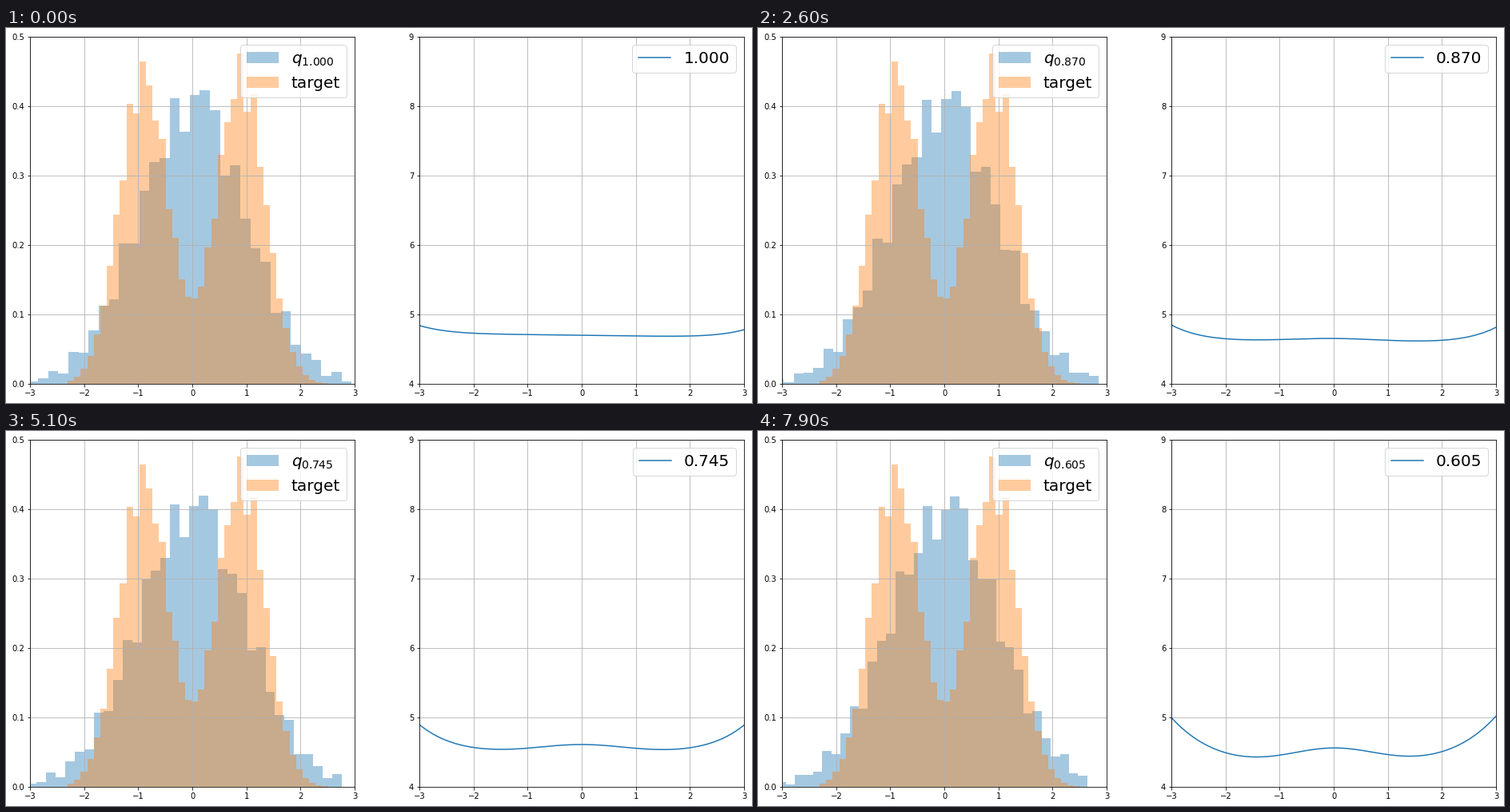
A matplotlib script that plays this animation: 933 by 470 pixels, repeating every 8000 ms.

```python
import numpy as np
import matplotlib.pyplot as plt
from matplotlib.animation import FuncAnimation

W, H, DPI = 933, 470, 72
FRAMES, INTERVAL = 80, 100
LEFT, BOTTOM, AX_W, AX_H = 30.2, 24, 405.82, 434.88

BINS = np.arange(-20, 14)  # counted from the bin just right of the centre
FIXED_START, FIXED_WIDTH, FIXED_BINS = -2.3063, .12063, 40
XS = np.linspace(-3, 3, 200)


def normal(x, mean=0, sd=1):
    return np.exp(-((x - mean) / sd) ** 2 / 2) / (sd * np.sqrt(2 * np.pi))


def ripple(distance, period):
    return np.cos(2 * np.pi * distance / period)


def fixed_heights(x):
    """Two equal bumps, with a ripple as sampling scatter."""
    p = (normal(x, -.9, .45) + normal(x, .9, .45)) / 2
    return p + .04 * ripple(x + .873, .289) * (p / .44) ** 2


def moving_heights(x, u):
    """One bump whose scatter stays put while the bins slide over it."""
    p = normal(x, sd=1 + .02 * u)
    distance = np.maximum(np.abs(x - .25) - .13, 0)
    return p + .035 * ripple(distance, .46) * np.sqrt(p / .4)


def histogram(u):
    width = .187 - .014 * u - .004 * u ** 2
    lefts = .3252 - .0488 * u + BINS * width
    return lefts, moving_heights(lefts + width / 2, u), width


def curve(u):
    """A flat bowl that steepens while a hump grows in its middle."""
    hump = .08 * u + .116 * u ** 2
    base = 4.70 - .139 * u - hump
    rise = 4.81 + .1975 * u ** 2 - base
    power = 6 - 2 * u ** 1.5
    tilt = -.01 + .014 * u
    return (base + rise * np.abs(XS / 3) ** power
            + hump * np.exp(-XS ** 2 / 1.25) + tilt * XS)


def make_axes(left, ylim, yticks):
    ax = fig.add_axes([left / W, BOTTOM / H, AX_W / W, AX_H / H])
    ax.set(xlim=(-3, 3), ylim=ylim, xticks=range(-3, 4), yticks=yticks)
    ax.grid(True)
    ax.set_autoscale_on(False)
    return ax


def draw_bars(lefts, heights, width, color, label):
    return hist_ax.bar(lefts, heights, width, align="edge", color=color,
                       alpha=.4, label=label)


def first_label(ax):
    return ax.legend(loc="upper right", fontsize=20).get_texts()[0]


fig = plt.figure(figsize=(W / DPI, H / DPI), dpi=DPI, facecolor="white")
hist_ax = make_axes(LEFT, (0, .5), np.arange(6) / 10)
line_ax = make_axes(LEFT + 1.2 * AX_W, (4, 9), range(4, 10))

bars = draw_bars(*histogram(0), "C0", "$q_{1.000}$")
fixed = FIXED_START + np.arange(FIXED_BINS) * FIXED_WIDTH
draw_bars(fixed, fixed_heights(fixed + FIXED_WIDTH / 2), FIXED_WIDTH,
          "C1", "target")
line, = line_ax.plot(XS, curve(0), color="C0", label="1.000")
q_text, t_text = first_label(hist_ax), first_label(line_ax)


def update(i):
    u = i / (FRAMES - 1)
    lefts, heights, width = histogram(u)
    for bar, x, h in zip(bars, lefts, heights):
        bar.set(x=x, height=h, width=width)
    line.set_ydata(curve(u))
    t = f"{1 - .005 * i:.3f}"
    q_text.set_text(f"$q_{{{t}}}$")
    t_text.set_text(t)
    return [*bars, line, q_text, t_text]


anim = FuncAnimation(fig, update, frames=FRAMES, interval=INTERVAL,
                     repeat=True, repeat_delay=0, blit=False)
plt.show()
```
